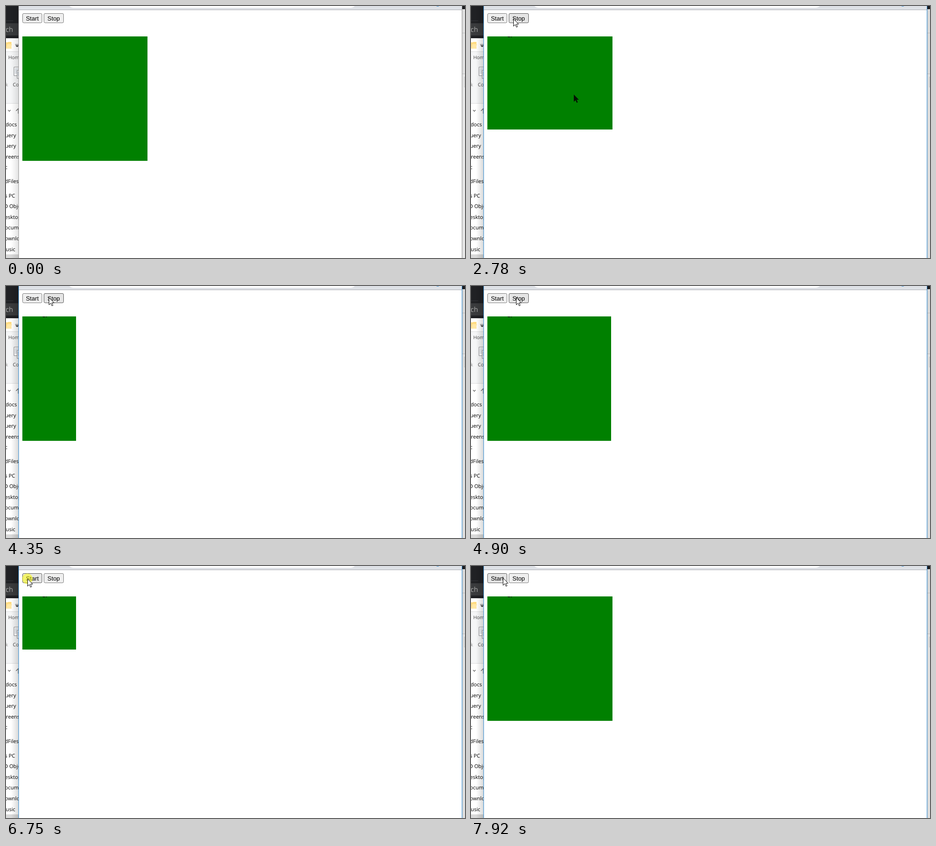
An HTML page for the animation above (7990 ms loop, 1009x555 px).

```html
<!DOCTYPE html>
<html lang="en">
<head>
<meta charset="utf-8">
<title>Box animation demo</title>
<style>
html, body { margin: 0; width: 100%; height: 100%; overflow: hidden; background: #fff; }
svg { display: block; width: 1009px; height: 555px; }
text { text-rendering: geometricPrecision; }
.ui { font: 11.5px "Open Sans", "Noto Sans", sans-serif; fill: #000; }
.button text { font: 13.333px "Liberation Sans", Arial, sans-serif; fill: #000; text-anchor: middle; }
.button rect { fill: #efefef; stroke: #767676; }
.button.hover rect { fill: #e5e5e5; stroke: #4f4f4f; }
</style>
</head>
<body>
<svg viewBox="0 0 1009 555">
  <defs>
    <linearGradient id="shade">
      <stop offset="0" stop-color="#000" stop-opacity="0"/>
      <stop offset="1" stop-color="#000" stop-opacity=".22"/>
    </linearGradient>
    <clipPath id="strip"><rect width="28" height="555"/></clipPath>
    <path id="arrow" d="M.5 .5V16.5L4.3 12.9L6.9 18.7L9.3 17.6L6.8 12H11.7Z"/>
  </defs>
  <rect width="1009" height="555" fill="#fff"/>

  <g clip-path="url(#strip)">
    <rect width="28" height="71" fill="#202124"/>
    <path d="M0 32.5H16" stroke="#34363a"/>
    <rect y="38" width="28" height="27" fill="#3a3b3d"/>
    <text x="-1" y="57" class="ui" style="font-size:15px;fill:#aaa">ch</text>
    <path d="M0 80H4L5 79H12V94H0Z" fill="#ffdc84"/>
    <path d="M0 94L3 84H13L11 94Z" fill="#ffe8a6"/>
    <path d="M20 84.5H28M21 87H28L24.5 90Z" stroke="#333" fill="#333" stroke-width=".8"/>
    <rect y="101" width="28" height="113" fill="#f5f6f7"/>
    <path d="M0 100.5H28M0 214.5H28" stroke="#dadbdc"/>
    <g fill="#fff" stroke="#8b8d91">
      <path d="M17.5 134.5H30V153.5H17.5Z"/>
      <path d="M19.5 138.5H28M19.5 141.5H28M19.5 144.5H28M19.5 147.5H28" stroke="#a9b6c6"/>
      <path d="M24.5 141.5H32V159.5H24.5Z"/>
      <path d="M26 146.5H30M26 149.5H30M26 152.5H30" stroke="#7f9fc4"/>
    </g>
    <path d="M4.5 229L7.3 232L10 229M22 231L27 226L32 231M27 226V237" fill="none" stroke="#666" stroke-width="1.4"/>
    <g id="labels" class="ui"></g>
    <rect y="547" width="28" height="8" fill="#d9d9d9"/>
  </g>

  <rect x="1003" width="6" height="555" fill="#f6f6f6"/>
  <rect x="1003" y="150" width="6" height="405" fill="#fcfcfc"/>
  <rect x="1003" width="6" height="7" fill="#202124"/>
  <path d="M1003 59.5H1009M1003 149.5H1009M1009 156.5H1007.5V178.5H1009" fill="none" stroke="#d2d2d2"/>

  <g id="shadow" fill="url(#shade)">
    <rect x="11" width="17" height="555"/>
    <rect x="-1020" width="17" height="555" transform="scale(-1 1)"/>
  </g>

  <rect x="28" width="975" height="555" fill="#fff"/>
  <rect x="28" width="975" height="8" fill="#dee1e6"/>
  <rect x="135" y="-24" width="636" height="28" rx="14" fill="#fff"/>
  <circle cx="949" cy="-5" r="6" fill="#2484d2"/>
  <path d="M28 8.5H1003" stroke="#a9abaf"/>
  <path id="frame" d="M27.8 0V555M1002.5 0V555" fill="none"/>

  <g id="start" class="button">
    <rect x="36.5" y="16.5" width="42.5" height="20.5" rx="2.5"/>
    <text x="57.8" y="31.7">Start</text>
  </g>
  <g id="stop" class="button">
    <rect x="83.5" y="16.5" width="43" height="20.5" rx="2.5"/>
    <text x="104.8" y="31.7">Stop</text>
  </g>
  <rect id="box" x="36" y="67" fill="#008000"/>
  <g id="residue" fill="#051205">
    <use id="trail" href="#arrow" x="225.5" y="194.5"/>
    <path d="M80 67H85L86 69H82ZM87 67.5H90V69H88Z" opacity=".75"/>
  </g>
  <circle id="press" r="11.5" fill="#ff0" fill-opacity=".52"/>
  <use id="cursor" href="#arrow" fill="#fff" stroke="#000"/>
</svg>
<script>
const LOOP = 7990, STEP = 68.5, PHASE = 2974, SLOW = 600;
const BIG = 274.5, SMALL = 117.5, FOCUS = 400;
const $ = id => document.getElementById(id);

const addLabel = (text, x, y, style) => {
  const el = document.createElementNS("http://www.w3.org/2000/svg", "text");
  el.textContent = text;
  el.setAttribute("x", x);
  el.setAttribute("y", y);
  el.style.cssText = style;
  $("labels").append(el);
};
const endingAt = [
  ["docs", 24, 265], ["uery", 22, 289], ["uery", 22, 312],
  ["c", 3, 359], ["dFiles", 28, 390], ["s PC", 20, 422]
];
for (const [text, x, y] of endingAt) addLabel(text, x, y, "text-anchor:end");
["3D Objects", "Desktop", "Documents", "Downloads", "Music"]
  .forEach((text, i) => addLabel(text, -10.8, 445 + i * 23.7, ""));
addLabel("reenshots", 0, 336, "");
addLabel("Home", 5, 117, "font-size:10.6px;fill:#444");
addLabel("k", -1, 177, "font-size:10.6px;fill:#999");
addLabel("Copy", 15, 177, "font-size:10.6px;fill:#444");

// start, side, target, optional time at which Stop jumps to the end
const legs = [
  [2492, "height", SMALL], [3101, "width", SMALL],
  [3724, "height", BIG], [4342, "width", BIG],
  [4959, "height", SMALL], [5576, "width", SMALL, 5890],
  [6777, "height", BIG], [7394, "width", BIG, 7580]
];
const route = [
  [400, 330, 290], [560, 226, 194], [700, 178, 162], [900, 85, 66], [1150, 60, 23],
  [1300, 60, 23], [1670, 99, 32], [1900, 99, 32], [1980, 102, 30], [2160, 102, 30],
  [2700, 93, 28], [3380, 89, 26], [4340, 94, 25], [5500, 105, 26], [5740, 105, 26],
  [5960, 105, 26], [6500, 50, 28], [6740, 47, 28], [6880, 47, 28], [7400, 88, 26],
  [7590, 88, 26], [7710, 72, 26], [7880, 72, 26], [7900, 70, 26]
];
const presses = [[1230, 1300], [5810, 5950], [6680, 6850], [7500, 7600]];

const swing = p => 0.5 - Math.cos(p * Math.PI) / 2;
const clamp = p => Math.min(1, Math.max(0, p));

function boxSize(t) {
  const size = { width: BIG, height: BIG };
  for (const [start, side, target, jump = Infinity] of legs) {
    if (t < start) break;
    const p = t >= jump ? 1 : clamp((t - start) / SLOW);
    size[side] += (target - size[side]) * swing(p);
  }
  // edges fall on whole pixels
  return { width: Math.round(size.width + 0.4), height: Math.round(size.height - 0.4) };
}

function pointer(t) {
  const next = route.findIndex(stop => stop[0] > t);
  if (next < 1) return route[next ? route.length - 1 : 0].slice(1);
  const [t0, x0, y0] = route[next - 1], [t1, x1, y1] = route[next];
  const p = (t - t0) / (t1 - t0);
  return [Math.round(x0 + (x1 - x0) * p), Math.round(y0 + (y1 - y0) * p)];
}

const show = (id, on) => $(id).setAttribute("visibility", on ? "visible" : "hidden");
const set = (id, attrs) => {
  for (const key in attrs) $(id).setAttribute(key, attrs[key]);
};

function draw(now) {
  const time = now % LOOP;
  const t = PHASE + Math.floor((time - PHASE) / STEP) * STEP;
  const focused = time >= FOCUS;
  const [x, y] = pointer(t);
  const over = (left, right) => focused && x >= left && x <= right && y >= 16 && y <= 37;

  set("frame", { stroke: focused ? "#1f80cc" : "#8c8c8c" });
  set("shadow", { opacity: focused ? 0.7 : 0.5 });
  set("box", boxSize(t));
  $("start").classList.toggle("hover", over(36, 79));
  $("stop").classList.toggle("hover", over(83, 127));
  set("cursor", { x, y });
  show("cursor", focused);
  set("press", { cx: x, cy: y });
  show("press", presses.some(([from, to]) => t >= from && t < to));
  show("trail", t > 620 && t < 2930);
  show("residue", t > 950);
}

const origin = performance.now();
function tick() {
  draw(performance.now() - origin);
  requestAnimationFrame(tick);
}
tick();
</script>
</body>
</html>
```
